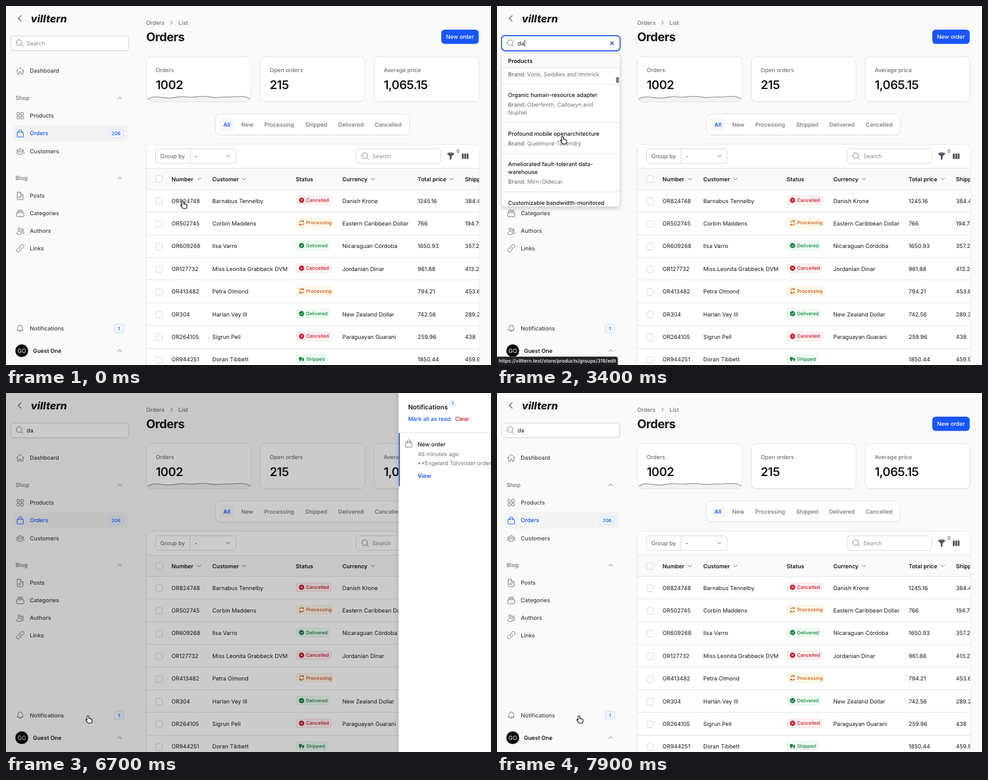
Animation of 800x592 px, one loop 8 s. Source, as an HTML page:

```html
<!DOCTYPE html>
<html lang="en">
<head>
<meta charset="utf-8">
<title>Orders</title>
<style>
html, body { margin: 0; width: 100%; height: 100%; overflow: hidden; background: #fafafa; }
svg { display: block; width: 100vw; height: 100vh; }
text { font-family: Inter, "Liberation Sans", sans-serif; text-rendering: geometricPrecision; white-space: pre; }
</style>
</head>
<body>
<svg id="stage" viewBox="0 0 800 592"></svg>
<script>
const LOOP = 8000, STEP = 100;
const BLUE = '#1855fb', INK = '#18181b', GRAY = '#71717a', LINE = '#e4e4e7', RED = '#c91425';

// Drawing helpers
const text = (x, mid, str, o = {}) => {
  const { size = 9.25, weight = 400, fill = INK, more = '' } = o;
  return `<text x="${x}" y="${mid + size * 0.364}" font-size="${size}" font-weight="${weight}" fill="${fill}" ${more}>${str}</text>`;
};
const box = (x, y, w, h, r = 0, fill = '#fff', stroke = 'none', more = '') =>
  `<rect x="${x}" y="${y}" width="${w}" height="${h}" rx="${r}" fill="${fill}" stroke="${stroke}" ${more}/>`;
const stroke = (d, color = GRAY, w = 1, more = '') =>
  `<path d="${d}" fill="none" stroke="${color}" stroke-width="${w}" stroke-linecap="round" stroke-linejoin="round" ${more}/>`;
const rule = (x1, x2, y, color = LINE) => stroke(`M${x1} ${y}H${x2}`, color);
const circle = (cx, cy, r) => `M${cx - r} ${cy}a${r} ${r} 0 1 0 ${2 * r} 0a${r} ${r} 0 1 0 ${-2 * r} 0`;
const square = (x, y) => `M${x + 1.5} ${y}h4a1.5 1.5 0 0 1 1.5 1.5v4a1.5 1.5 0 0 1-1.5 1.5h-4a1.5 1.5 0 0 1-1.5-1.5v-4a1.5 1.5 0 0 1 1.5-1.5z`;
const chevron = (x, y, up) => stroke(up ? `M${x - 3} ${y + 1.5}l3-3 3 3` : `M${x - 3} ${y - 1.5}l3 3 3-3`);

// Icons on a 24-unit grid
const ICONS = {
  home: 'M2.2 12L12 2.5 21.8 12M4.5 10v10a1 1 0 0 0 1 1h4.2v-6h4.6v6h4.2a1 1 0 0 0 1-1V10',
  grid: square(3.5, 3.5) + square(13.5, 3.5) + square(3.5, 13.5) + square(13.5, 13.5),
  bag: 'M15.8 10.5V6a3.8 3.8 0 0 0-7.6 0v4.5M4.6 8.5h14.8l1.3 12a1 1 0 0 1-1 1.2H4.3a1 1 0 0 1-1-1.2z',
  group: circle(12, 7, 3) + circle(5, 10, 2) + circle(19, 10, 2) +
    'M6 19c0-8 12-8 12 0c-3 2.2-9 2.2-12 0M1.5 18c-.5-4 2-5 4.5-4.5M22.5 18c.5-4-2-5-4.5-4.5',
  page: 'M5 2.5h7l7.5 7.5v11a1 1 0 0 1-1 1H5a1 1 0 0 1-1-1V3.5a1 1 0 0 1 1-1zM12 2.5v6a1 1 0 0 0 1 1h6.5M8 14h8M8 17h5',
  stack: 'M4.5 10h15a2 2 0 0 1 2 2v7a2 2 0 0 1-2 2h-15a2 2 0 0 1-2-2v-7a2 2 0 0 1 2-2zM4.5 6.7h15M6.5 3.5h11',
  users: circle(9, 7, 3.4) + circle(17.5, 9, 2.6) + 'M2.5 19.5c0-9 13-9 13 0c-4 2.5-9 2.5-13 0M17 18.5c2 .3 4-.2 5-1c0-4-3-5.5-6-4',
  link: 'M13 8.7a4.5 4.5 0 0 1 1.2 7.2l-4.5 4.5a4.5 4.5 0 0 1-6.4-6.4l1.8-1.8M18.9 11.6l1.8-1.8a4.5 4.5 0 0 0-6.4-6.4L9.8 7.9a4.5 4.5 0 0 0 1.2 7.2',
  bell: 'M9 17.5a3 3 0 0 0 6 0M4 16.5c2-2 2.2-4 2.2-7.5a5.8 5.8 0 0 1 11.6 0c0 3.5.2 5.5 2.2 7.5c-5 1.3-11 1.3-16 0z',
  search: circle(10.5, 10.5, 7.5) + 'M16 16l5 5'
};
const icon = (name, x, y, color = GRAY, k = 0.62) =>
  stroke(ICONS[name], color, 1.5, `transform="translate(${x - 12 * k} ${y - 12 * k}) scale(${k})"`);
const pill = (x, y, w, h, str, size = 7.9) =>
  box(x, y, w, h, 3.5, '#eff6ff', '#cfe0fd') +
  text(x + w / 2, y + h / 2, str, { size, weight: 500, fill: BLUE, more: 'text-anchor="middle"' });

function sidebar() {
  const items = [
    ['Dashboard', 'home', 107], ['Products', 'grid', 181], ['Orders', 'bag', 210], ['Customers', 'group', 239.5],
    ['Posts', 'page', 313], ['Categories', 'stack', 342], ['Authors', 'users', 371], ['Links', 'link', 399.5],
    ['Notifications', 'bell', 531.5]
  ];
  let s = stroke('M25 15.8L20.2 20.5 25 25.2', '#52525b', 1.1) +
    text(41, 20.8, 'villtern', { size: 17, weight: 800, more: 'font-style="italic"' }) +
    box(12, 196.5, 189, 27, 5.5, '#f3f3f4');
  for (const [name, ic, y] of items) {
    const on = name === 'Orders';
    s += icon(ic, 23.5, y, on ? BLUE : GRAY) + text(39.3, y, name, { weight: 500, fill: on ? BLUE : '#3f3f46' });
  }
  for (const [name, y] of [['Shop', 152], ['Blog', 284]])
    s += text(15.8, y, name, { weight: 500, fill: GRAY }) + chevron(187.7, y - 0.3, true);
  return s + pill(169.5, 203.5, 24, 13.5, '206') + pill(178.5, 524.5, 16, 14.5, '1') +
    `<circle cx="26" cy="568.5" r="10.6" fill="#09090b"/>` +
    text(26, 568.5, 'GO', { fill: '#fff', more: 'text-anchor="middle"' }) +
    text(44.5, 568.5, 'Guest One', { weight: 600 }) + chevron(187.7, 568.3, true);
}

function summary() {
  const card = 'filter="url(#soft)"';
  let s = text(231.2, 27.3, 'Orders', { weight: 500, fill: GRAY }) + stroke('M271.6 24.3l3 3-3 3') +
    text(284.5, 27.3, 'List', { weight: 500, fill: GRAY }) +
    text(231.2, 50.8, 'Orders', { size: 19.8, weight: 700, more: 'letter-spacing="-0.5"' }) +
    box(718, 39, 61.7, 23.5, 5.5, BLUE) +
    text(748.8, 50.8, 'New order', { weight: 500, fill: '#fff', more: 'text-anchor="middle"' });
  [['Orders', '1002'], ['Open orders', '215'], ['Average price', '1,065.15']].forEach(([label, value], i) => {
    const x = 231.5 + 188 * i;
    s += box(x, 83.5, 172.5, 74, 8, '#fff', LINE, card) +
      text(x + 15.5, 106, label, { weight: 500, fill: GRAY }) +
      text(x + 15.5, 130, value, { size: 19.8, weight: 600, more: 'letter-spacing="-0.5"' });
  });
  const wave = 'M234 153.5C242 148.5 250 149.5 258 151S274 152 284 150S302 151.5 312 150S330 149 340 150.5S356 149.5 366 150S392 146 402.5 153';
  s += `<path d="${wave}V156.5H236z" fill="#f1f1f2"/>` + stroke(wave, '#9b9ba3', 1.3);
  s += box(345.5, 178, 320, 34.5, 8, '#fff', LINE, card) + box(352.5, 184.5, 24, 21.5, 5, '#f8f8f9');
  [['All', 358.5], ['New', 388], ['Processing', 426], ['Shipped', 493.5], ['Delivered', 548], ['Cancelled', 608.2]].forEach(([name, x], i) => {
    s += text(x, 195.3, name, { weight: i ? 500 : 600, fill: i ? GRAY : BLUE });
  });
  return s;
}

const STATUS = {
  Cancelled: [57.5, RED, '#fef2f2', '#fbdcdc'],
  Processing: [60.5, '#c4520e', '#fffaeb', '#fdeccb'],
  Delivered: [54.5, '#15803d', '#f0fdf4', '#d3f3dd'],
  Shipped: [50.5, '#15803d', '#f0fdf4', '#d3f3dd']
};
function badge(name, y) {
  const [w, color, bg, edge] = STATUS[name];
  const dot = (x, cy, r) => `<circle cx="${x}" cy="${cy}" r="${r}" fill="${color}"/>`;
  const disc = dot(487.5, y, 4.3);
  const art = {
    Cancelled: disc + stroke(`M486.1 ${y - 1.4}l2.8 2.8m0-2.8l-2.8 2.8`, '#fff'),
    Delivered: disc + stroke(`M485.6 ${y + 0.2}l1.4 1.5 2.3-3`, '#fff'),
    Processing: stroke(`M484 ${y - 0.8}a3.7 3.7 0 0 1 6.6-1.3v-1.7m0 1.7h-2M491 ${y + 0.8}a3.7 3.7 0 0 1-6.6 1.3v1.7m0-1.7h2`, color, 1.1),
    Shipped: box(483.3, y - 3, 4.6, 4.6, 0.6, color) + box(488.5, y - 1.6, 3.2, 3.2, 0.6, color) +
      dot(485.3, y + 2.4, 1.3) + dot(490, y + 2.4, 1.3)
  };
  return box(478.5, y - 6.8, w, 13.6, 3.5, bg, edge) + art[name] + text(495, y, name, { size: 7.9, weight: 500, fill: color });
}

function table() {
  const rows = [
    ['OR824748', 'Barnabus Tennelby', 'Cancelled', 'Danish Krone', '1245.16', '384.41'],
    ['OR502745', 'Corbin Maddens', 'Processing', 'Eastern Caribbean Dollar', '766', '194.73'],
    ['OR609268', 'Ilsa Varro', 'Delivered', 'Nicaraguan Córdoba', '1650.93', '357.25'],
    ['OR127732', 'Miss Leonita Grabbeck DVM', 'Cancelled', 'Jordanian Dinar', '961.88', '413.28'],
    ['OR413482', 'Petra Olmond', 'Processing', '', '794.21', '453.60'],
    ['OR304', 'Harlan Vey III', 'Delivered', 'New Zealand Dollar', '742.56', '289.22'],
    ['OR264105', 'Sigrun Pell', 'Cancelled', 'Paraguayan Guarani', '259.96', '438'],
    ['OR944251', 'Doran Tibbett', 'Shipped', '', '1850.44', '459.94']
  ];
  const columns = [273, 340.3, 478, 554.8, 679, 757];
  const check = y => box(247, y - 5.5, 11, 11, 2.5, '#fff', '#d6d6da');
  let s = box(231.5, 228, 549, 400, 8, '#fff', LINE, 'filter="url(#soft)"') +
    box(246.5, 235.5, 133, 24, 5.5, '#fff', '#d9d9dd') + stroke('M303.5 236V259', '#dedee2') +
    text(254.5, 247.8, 'Group by', { fill: GRAY, weight: 500 }) + text(311, 247.3, '-') + chevron(366.7, 247.5) +
    box(577.5, 235.5, 139.5, 24, 5.5, '#fff', '#d9d9dd') + icon('search', 592.5, 247.7) +
    text(604.3, 247.8, 'Search', { fill: '#8b8b94' }) +
    `<path d="M728 242.5q5.5-2 11 0v1.8l-4 4v4.2l-3 1.5v-5.7l-4-4z" fill="#5b5b64"/>` +
    text(743, 239, '0', { size: 7.9, weight: 500, fill: '#52525b' });
  for (let i = 0; i < 3; i++) s += box(751.8 + 4 * i, 243.2, 3.2, 9, 0.8, '#5b5b64');
  s += box(232, 267.5, 548, 35, 0, '#fafafa') + rule(232, 780, 267.5) + rule(232, 780, 302.5) + check(285.3);
  ['Number', 'Customer', 'Status', 'Currency', 'Total price', 'Shipping cost'].forEach((name, i) => {
    s += text(columns[i], 285.2, name, { weight: 600 });
  });
  for (const x of [318.3, 393, 605.2, 735]) s += chevron(x, 285.3);
  rows.forEach((row, i) => {
    const y = 321.2 + 37.4 * i;
    s += check(y + 0.8) + rule(232, 780, Math.round(y + 18) + 0.5);
    row.forEach((cell, c) => { s += c === 2 ? badge(cell, y - 1) : text(columns[c], y, cell); });
  });
  return `<g clip-path="url(#tableClip)">${s}</g>`;
}

// Search results: title lines and brand lines are split by "|"
const BRANDS = ['Tolvey, Cassen and Drumholt', 'Bron-Mellowick', 'Fenlowe, Marsk and Orbell', 'Dorvel, Pine and Wexbridge',
  'Wem-Tarlo', 'Quellmore-Tavendry', 'Soskel, Lumis and Tarn', 'Mirn-Oldecar', 'Pellom-Varrick', 'Addlow Group'];
const PRODUCTS = [
  ['Adaptive modular database', 'Wem-Tarlo'], ['Focused secondary toolset', 'Bron-Mellowick'],
  ['Shared dynamic paradigm', 'Vonk, Seddles and Immrick'],
  ['Organic human-resource adapter', 'Oberfenth, Callowyn and|Nuphel'],
  ['Profound mobile openarchitecture', 'Quellmore-Tavendry'],
  ['Ameliorated fault-tolerant data-|warehouse', 'Mirn-Oldecar'],
  ['Customizable bandwidth-monitored|data array', 'Pellom-Varrick'],
  ['Balanced static database', 'Addlow Group'], ['Managed discrete data layer', 'Wem-Tarlo'],
  ['Reduced regional standard', 'Mirn-Oldecar'], ['Secured radical dashboard', 'Bron-Mellowick']
];
const TOP = 79, ROW = 34.8, HEAD = 23, ANCHOR = 3;
const brandsEnd = HEAD + BRANDS.length * ROW;
let anchorY = 0;

function results() {
  let s = '';
  BRANDS.forEach((name, i) => {
    const y = TOP + HEAD + ROW * i;
    s += text(18.3, y + 17.6, name, { weight: 500 }) + rule(8, 202, y + ROW);
  });
  let y = TOP + brandsEnd + HEAD;
  PRODUCTS.forEach(([title, brand], i) => {
    if (i === ANCHOR) anchorY = y;
    let mid = y + 18;
    for (const line of title.split('|')) { s += text(18.3, mid, line, { weight: 500 }); mid += 13; }
    mid += 2.7;
    brand.split('|').forEach((line, n) => {
      s += text(18.3, mid, n ? line : `<tspan font-weight="500">Brand:</tspan> ${line}`, { fill: GRAY });
      mid += 13;
    });
    y = mid + 3.8;
    s += rule(8, 202, y);
  });
  return s;
}
const heading = (id, name) => `<g id="${id}">${box(8, TOP, 195, HEAD, 0, '#fafafa')}${rule(8, 202, TOP + HEAD)}${text(18.3, 90.3, name, { weight: 600 })}</g>`;

function panel() {
  return box(0, -10, 300, 620, 0, '#fff', 'none', 'filter="url(#lift)"') +
    text(15.5, 23, 'Notifications', { size: 10.6, weight: 600 }) + pill(84, 12.5, 10, 10.5, '1', 7.5) +
    text(15.5, 43, 'Mark all as read', { weight: 500, fill: BLUE }) + text(93, 43, 'Clear', { weight: 500, fill: RED }) +
    stroke('M270 19l7 7m0-7l-7 7', '#a1a1aa', 1.2) + rule(0, 300, 65.5) + box(0, 66, 2, 87.5, 0, BLUE) +
    icon('bag', 16.7, 83.3) + text(31.3, 84.5, 'New order', { weight: 500 }) +
    text(31.3, 100.3, '46 minutes ago', { fill: GRAY }) +
    text(31.3, 116, '**Engelard Tolvinster ordered 3 products.**', { fill: GRAY }) +
    text(31.3, 137, 'View', { weight: 600, fill: BLUE });
}

const POINTERS = {
  hand: `<path d="M-1.8-6c1 0 1.5.6 1.5 1.5v3.2c1-.4 1.6 0 1.8.5c.8-.3 1.5 0 1.7.6c1-.2 1.7.2 1.7 1.2v2.2c0 2-1 3.3-3 3.3h-2c-1.5 0-2.4-.8-3-1.9l-2-3.2c-.6-1 .5-1.8 1.3-1l.5.6v-5.5c0-.9.5-1.5 1.5-1.5z" fill="#fff" stroke="#111" stroke-width="1.1"/>`,
  arrow: `<path d="M-2-5V5.2l2.3-2.1 1.5 3.4 1.8-.8-1.5-3.3h3.1z" fill="#111" stroke="#fff" stroke-width=".7"/>`,
  beam: stroke('M-2-5q2 0 2 1.5v7q0 1.5-2 1.5M2-5q-2 0-2 1.5M0 3.5q0 1.5 2 1.5', '#222', 0.9)
};

const stage = document.getElementById('stage');
stage.innerHTML = `<defs>
  <filter id="soft" x="-10%" y="-10%" width="120%" height="130%"><feDropShadow dx="0" dy=".7" stdDeviation=".7" flood-opacity=".07"/></filter>
  <filter id="lift" x="-20%" y="-20%" width="140%" height="140%"><feDropShadow dx="0" dy="3" stdDeviation="3.5" flood-opacity=".18"/></filter>
  <clipPath id="tableClip"><path d="M228 220H780.5V592H228z"/></clipPath>
  <clipPath id="dropClip"><rect x="8" y="${TOP}" width="194.5" height="251.5" rx="5"/></clipPath>
</defs>` + box(0, 0, 800, 592, 0, '#fafafa') + sidebar() + summary() + table() +
  '<rect id="field" rx="5.5" fill="#fff" filter="url(#soft)"/>' +
  icon('search', 22.5, 61.3) + text(34, 61.3, '', { more: 'id="query"' }) +
  stroke('M45.8 56V66.5', INK, 0.9, 'id="caret"') + stroke('M187.3 59l4.4 4.4m0-4.4l-4.4 4.4', '#1d4ed8', 1.5, 'id="wipe"') +
  `<g id="drop">${box(8, TOP, 194.5, 251.5, 5, '#fff', '#e8e8ea', 'filter="url(#lift)"')}
    <g clip-path="url(#dropClip)">${box(8, 0, 195, ROW, 0, '#f4f4f5', 'none', 'id="hover"')}<g id="list">${results()}</g>
    ${heading('brands', 'Brands')}${heading('products', 'Products')}${box(196.3, 0, 5, 10, 2.5, '#7d7d80', 'none', 'id="thumb"')}</g></g>` +
  `<g id="address">${box(-4, 578.5, 203, 18, 3, '#202124', '#55565a')}${text(3, 585.5, 'https://villtern.test/store/products/groups/318/edit', { size: 8, weight: 500, fill: '#fff' })}</g>` +
  box(0, 0, 800, 592, 0, '#09090b', 'none', 'id="shade"') + `<g id="panel">${panel()}</g>` +
  '<g id="pointer">' + Object.entries(POINTERS).map(([k, v]) => `<g id="${k}">${v}</g>`).join('') + '</g>';

const el = {};
stage.querySelectorAll('[id]').forEach(n => { el[n.id] = n; });
const show = (id, on) => el[id].setAttribute('visibility', on ? 'inherit' : 'hidden');
const move = (id, x, y) => el[id].setAttribute('transform', `translate(${x} ${y})`);
const attrs = (id, o) => { for (const k in o) el[id].setAttribute(k, o[k]); };

// Timing
const ease = u => { u = Math.min(1, Math.max(0, u)); return u * u * (3 - 2 * u); };
const ramp = (t, start, length) => ease((t - start) / length);
function track(keys, t) {
  let i = 0;
  while (i < keys.length - 2 && t >= keys[i + 1][0]) i++;
  const [a, b] = [keys[i], keys[i + 1]], u = ramp(t, a[0], b[0] - a[0]);
  return a.slice(1).map((v, k) => v + (b[k + 1] - v) * u);
}
const PATH = [[0, 293.5, 327.5], [900, 110, 62], [2100, 110, 62], [2600, 110, 221], [4150, 110, 221],
  [4500, 403, 39], [5100, 403, 39], [6200, 137, 538], [LOOP, 137, 538]];
const reach = anchorY - 129;
const SCROLL = [[0, 0], [2900, 0], [3400, reach], [3650, reach * 1.35], [3800, reach * 1.35], [4150, 0], [LOOP, 0]];

function render(t) {
  const focus = t >= 900 && t < 4600, typed = t < 1200 ? '' : t < 1400 ? 'd' : 'da';
  const open = t >= 2100 && t < 4800;
  attrs('field', focus
    ? { x: 7.5, y: 48.8, width: 195.5, height: 25, stroke: BLUE, 'stroke-width': 1.7 }
    : { x: 8, y: 49.5, width: 194.5, height: 24, stroke: '#d6d6da', 'stroke-width': 1 });
  el.query.textContent = typed || 'Search';
  attrs('query', { fill: typed ? INK : '#8b8b94' });
  const blinkFrom = t < 1200 ? 900 : t < 1400 ? 1200 : 1400;
  show('caret', focus && Math.floor((t - blinkFrom) / 500) % 2 === 0);
  move('caret', [-11.5, -5.7, 0][typed.length], 0);
  show('wipe', focus && typed);

  const [x, y] = track(PATH, t), [s] = track(SCROLL, t);
  show('drop', open);
  move('list', 0, -s);
  move('brands', 0, Math.min(0, brandsEnd - HEAD - s));
  move('products', 0, Math.max(0, brandsEnd - s));
  attrs('thumb', { y: 80 + 37 * s / reach });
  show('thumb', open && s > 0);
  const row = Math.floor((y - TOP - HEAD) / ROW);
  show('hover', open && s === 0 && x < 203 && row >= 0);
  attrs('hover', { y: TOP + HEAD + ROW * row });
  show('address', t >= 2900 && t < 4200);

  const slide = ramp(t, 6546, 300) - ramp(t, 7600, 210);
  const dim = ramp(t, 6567, 300) - ramp(t, 7625, 230);
  move('panel', 800 - 293 * slide, 0);
  show('panel', slide > 0.001);
  attrs('shade', { opacity: 0.5 * dim });

  const inField = x < 203 && y > 49 && y < 74;
  const onLink = (x < 208 && y > 95) || (x > 231 && y > 302);
  const kind = inField ? 'beam' : onLink ? 'hand' : 'arrow';
  for (const k in POINTERS) show(k, k === kind);
  show('pointer', t < 1200 || t >= 2100);
  move('pointer', x, y);
}

let start = null;
function tick(now) {
  if (start === null) start = now;
  render(Math.floor(((now - start) % LOOP) / STEP) * STEP);
  requestAnimationFrame(tick);
}
render(0);
requestAnimationFrame(tick);
</script>
</body>
</html>
```
